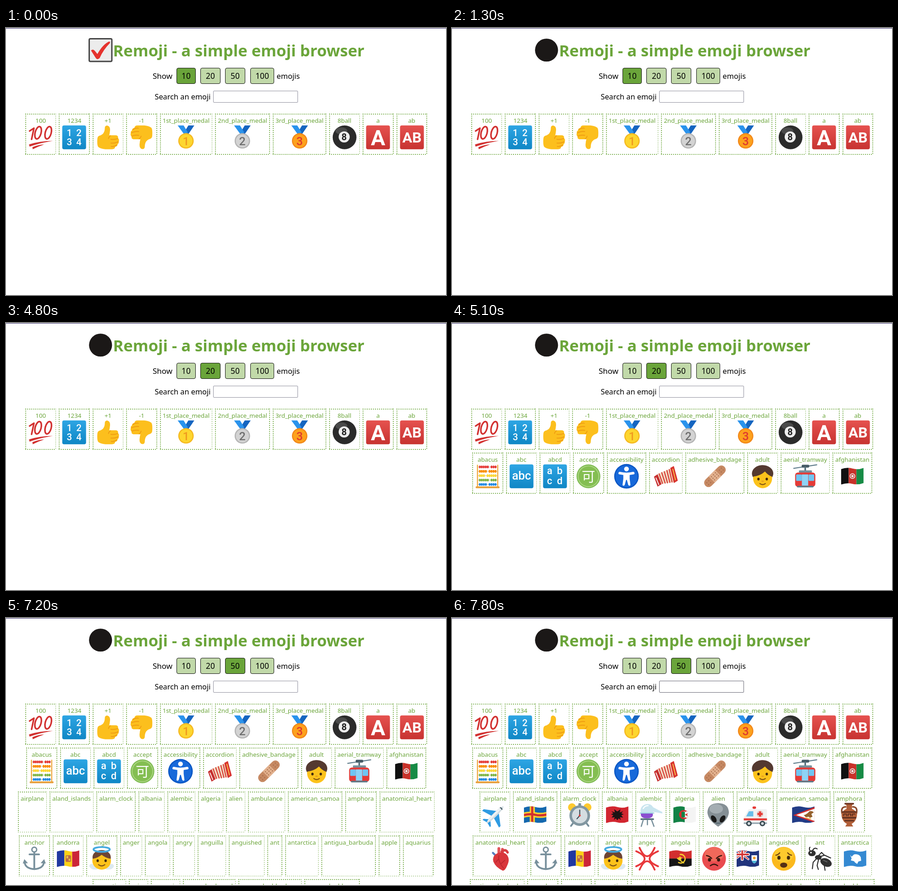
Recreate the animation shown at these times as an HTML page. Size 960x583 px, loop 8 s.

```html
<!DOCTYPE html>
<html lang="en">
<meta charset="utf-8">
<title>Emoji browser</title>
<style>
  html, body { margin: 0; width: 960px; height: 583px; overflow: hidden; background: #fff; }
  body { position: relative; font: 17px "Noto Sans", sans-serif; color: #000; }
  #bar { position: absolute; width: 960px; height: 1px; background: #3b3270; }
  #page > * { position: absolute; box-sizing: border-box; white-space: nowrap; }
  h1 { margin: 0; left: 0; top: 21px; width: 961px; height: 55px; display: flex; justify-content: center;
       font-size: 34.6px; line-height: 55px; color: #6ba53a; }
  h1 svg { width: 54.5px; height: 54.5px; }
  .btn { top: 87px; height: 35px; line-height: 33px; border: 1px solid #111; border-radius: 4px;
         text-align: center; font-size: 17.3px; background: #c1d9a9; }
  .btn.on { background: #6aa43a; }
  .txt { line-height: 24px; }
  #field { left: 452px; top: 137px; width: 184.5px; height: 26px; border: 1px solid #8f8f9d; border-radius: 2px; }
  #wait { left: 0; width: 961px; top: 184px; text-align: center; }
  #grid { left: 20.5px; top: 187.2px; width: 920px; display: flex; flex-wrap: wrap; justify-content: center; gap: 6.2px 6px; }
  .cell { --d: #6ba53a 1.8px, transparent 0; box-sizing: border-box; height: 89.6px; padding: 8px 6px 0; text-align: center;
    font-size: 13.3px; line-height: 15.7px; color: #6ba53a;
    background: linear-gradient(90deg, var(--d)) 0 0 / 4.4px 1.5px round no-repeat,
      linear-gradient(90deg, var(--d)) 0 100% / 4.4px 1.5px round no-repeat,
      linear-gradient(var(--d)) 0 0 / 1.5px 4.4px no-repeat round,
      linear-gradient(var(--d)) 100% 0 / 1.5px 4.4px no-repeat round; }
  .cell.hover { background-color: #e4efd9; }
  .cell svg { display: block; margin: auto; width: 55.4px; height: 55.4px; }
  [hidden], .cell[hidden], .cell svg.off, h1 svg.off { display: none; }
</style>
<svg width="0" height="0" style="position:absolute">
  <clipPath id="wave"><path d="M7 28Q36 17 64 25T120 22V98Q92 109 64 102T7 106Z"/></clipPath>
  <linearGradient id="shade" x2="0" y2="1">
    <stop stop-color="#fff" stop-opacity=".12"/><stop offset="1" stop-opacity=".12"/>
  </linearGradient>
</svg>
<div id="bar"></div>
<div id="page">
  <h1 id="title"></h1>
  <div class="txt" style="left:320px;top:93px">Show</div>
  <div class="btn" style="left:372px;width:42px">10</div>
  <div class="btn" style="left:424px;width:44px">20</div>
  <div class="btn" style="left:478px;width:44px">50</div>
  <div class="btn" style="left:533px;width:52px">100</div>
  <div class="txt" style="left:590.5px;top:93px;font-size:16.3px">emojis</div>
  <div class="txt" style="left:324.5px;top:138px;font-size:16.3px">Search an emoji</div>
  <div id="field"></div>
  <div id="wait">Loading...</div>
  <div id="grid"></div>
</div>
<script>
const $ = id => document.getElementById(id);

// Drawing helpers; every picture lives in a 128 x 128 box.
const p = (d, f) => `<path d="${d}" fill="${f}"/>`;
const s = (d, col, w = 6) =>
  `<path d="${d}" fill="none" stroke="${col}" stroke-width="${w}" stroke-linecap="round" stroke-linejoin="round"/>`;
const e = (x, y, rx, ry, f) => `<ellipse cx="${x}" cy="${y}" rx="${rx}" ry="${ry}" fill="${f}"/>`;
const c = (x, y, r, f) => e(x, y, r, r, f);
const r = (x, y, w, h, f, rx = 0) => `<rect x="${x}" y="${y}" width="${w}" height="${h}" rx="${rx}" fill="${f}"/>`;
const t = (x, y, size, str, f = '#fff', weight = 500) =>
  `<text x="${x}" y="${y}" font-size="${size}" fill="${f}" font-weight="${weight}" text-anchor="middle" font-family="Roboto,'Noto Sans CJK JP',sans-serif">${str}</text>`;
const turn = (a, body) => `<g transform="rotate(${a} 64 64)">${body}</g>`;
const svg = body => `<svg viewBox="0 0 128 128">${body}</svg>`;

const tile = (col, body) => r(4, 4, 120, 120, col, 9) + r(4, 4, 120, 120, 'url(#shade)', 9) + body;
const blue = body => tile('#1199e0', body);
const red = body => tile('#e23a37', body);
const flag = body => `<g clip-path="url(#wave)">${body}</g>`;
const field = col => r(0, 0, 128, 128, col);
const band = (y, w, col) => s(`M0 ${y}Q36 ${y - 10} 64 ${y - 3}T128 ${y - 6}`, col, w);
const thirds = (a, b, d) => r(0, 0, 45, 128, a) + r(45, 0, 39, 128, b) + r(84, 0, 44, 128, d);
const eyes = (dx, y, rx, ry, f = '#422b0d') => e(64 - dx, y, rx, ry, f) + e(64 + dx, y, rx, ry, f);
const thumb = p('M10 72Q10 57 27 54Q44 46 47 26L48 13Q51 3 62 5Q75 9 74 28Q73 43 70 54H104Q117 56 114 68Q122 74 118 85Q119 95 112 99Q111 110 100 112Q98 124 84 124H50Q26 122 14 112Q8 104 10 72Z', '#fcbf1d')
  + s('M78 74Q96 77 113 70M78 93Q97 95 115 87M80 110Q92 113 108 103M76 56Q68 62 66 70', '#ee9a12', 4);
const medal = (n, rim, fill, ink) =>
  p('M106 4H76L54 40 76 48Z', '#1565c0') + p('M22 4H52L74 40 54 48Z', '#2a93ec')
  + c(64, 82, 39, rim) + c(64, 82, 33, fill) + t(64, 103, 58, n, ink);
const hair = '#6d4434';

const art = {
  100: s('M8 32 30 18 18 74', '#d23130', 8)
    + [51, 102].map(x => `<ellipse cx="${x}" cy="41" rx="15" ry="32" transform="rotate(15 ${x} 41)" fill="none" stroke="#d23130" stroke-width="8"/>`).join('')
    + p('M5 100Q60 82 125 82Q62 92 8 111Z', '#d23130') + p('M22 114Q52 101 82 100Q52 110 24 124Z', '#d23130'),
  1234: blue(t(40, 58, 47, 1) + t(88, 58, 47, 2) + t(40, 104, 47, 3) + t(88, 104, 47, 4)),
  '+1': thumb,
  '-1': turn(180, thumb),
  '1st_place_medal': medal(1, '#f5b921', '#fdd62f', '#ef9b20'),
  '2nd_place_medal': medal(2, '#b5b5b5', '#d3d3d3', '#6f6f6f'),
  '3rd_place_medal': medal(3, '#f2881a', '#fda21d', '#df3b2f'),
  '8ball': c(64, 64, 60, '#2b2b2b') + e(48, 32, 30, 18, '#4a4a4a') + c(62, 62, 28, '#eee') + t(62, 79, 46, 8, '#222', 700),
  a: red(t(64, 103, 108, 'A', '#fff', 700)),
  ab: red(t(64, 90, 74, 'AB', '#fff', 700)),
  abacus: r(10, 6, 6, 112, '#f3b04b') + r(112, 6, 6, 112, '#f3b04b')
    + ['#e53935', '#fb8c00', '#fdd835', '#7cb342', '#1e88e5'].map((col, j) => {
      const y = 17 + j * 22;
      let row = s(`M14 ${y}H114`, '#b0a090', 2);
      for (let k = 0; k < 8; k++) row += e(25 + k * 10 + (k > 4 - j % 3 ? 9 : 0), y, 5, 7, col);
      return row;
    }).join('') + r(4, 115, 120, 9, '#e7a03c', 3),
  abc: blue(t(64, 81, 59, 'abc')),
  abcd: blue(t(37, 54, 50, 'a') + t(88, 54, 50, 'b') + t(37, 104, 50, 'c') + t(88, 104, 50, 'd')),
  accept: c(64, 64, 60, '#7cb950') + c(64, 64, 55, '#a9d57f') + c(64, 64, 50, '#84be52') + t(64, 89, 68, '可'),
  accessibility: c(64, 64, 62, '#0b57c4') + c(64, 64, 56, '#1769da') + c(64, 27, 12, '#fff')
    + s('M30 48Q64 56 98 48', '#fff', 13) + p('M48 46H80V76L84 108Q80 116 73 108L66 82H62L55 108Q48 116 44 108L48 76Z', '#fff'),
  accordion: p('M20 54L90 24 106 92 40 102Z', '#f3e3cb')
    + s('M30 52 47 100M43 46 60 98M56 41 72 97M69 35 84 95M81 30 95 93', '#d9473f', 6)
    + p('M4 66L22 54 42 104 22 116Z', '#c62f2f') + p('M86 22L104 12 124 86 104 98Z', '#d8342f')
    + s('M14 72 28 106', '#fff', 4) + s('M99 28 112 82', '#ffd24d', 4),
  adhesive_bandage: turn(-45, r(-4, 42, 136, 44, '#c68963', 22) + r(41, 42, 46, 44, '#e2b18e')
    + [50, 64, 78].map(x => c(x, 53, 3, '#a96e4c') + c(x, 64, 3, '#a96e4c') + c(x, 75, 3, '#a96e4c')).join('')
    + [12, 26, 102, 116].map(x => c(x, 58, 3, '#a96e4c') + c(x, 71, 3, '#a96e4c')).join('')),
  adult: e(64, 50, 54, 42, '#543930') + e(64, 74, 48, 50, '#fcc21b') + p('M16 66Q8 10 62 8Q120 10 112 66Q92 60 76 40Q52 62 16 66Z', '#543930')
    + eyes(21, 78, 6, 7) + s('M50 101Q64 111 78 101', '#7b4f16', 5) + e(64, 89, 7, 3, '#e59b20'),
  aerial_tramway: s('M6 24 122 6', '#607d8b', 5) + r(46, 6, 38, 14, '#455a64', 5) + s('M64 18V40', '#546e7a', 8)
    + r(32, 34, 66, 12, '#78909c', 4) + r(13, 45, 102, 72, '#e53a36', 14)
    + [18, 47, 81].map((x, i) => r(x, 55, i == 1 ? 32 : 28, 32, '#6fc5f2', 3)).join('') + r(47, 55, 32, 56, '#8ed3f6') + r(22, 112, 84, 8, '#607d8b', 4),
  afghanistan: flag(thirds('#111', '#c8322a', '#168b45')) + c(64, 63, 14, '#eee') + c(64, 63, 10, '#c8322a') + c(64, 63, 6, '#eee'),
  airplane: turn(45, p('M57 44L4 84V95L58 79ZM71 44L124 84V95L70 79Z', '#2e9be2') + p('M60 100L38 119V126L64 119 90 126V119L68 100Z', '#2e9be2')
    + e(64, 63, 10, 59, '#d3dde2') + e(61, 60, 5, 54, '#eef3f5') + s('M58 20Q64 15 70 20', '#455a64', 5)),
  aland_islands: flag(field('#1468ae') + band(67, 26, '#f8cf30') + r(36, 0, 26, 128, '#f8cf30') + band(67, 11, '#d32f2f') + r(43, 0, 11, 128, '#d32f2f')),
  alarm_clock: s('M32 104 20 120M96 104 108 120', '#78909c', 9) + c(25, 26, 20, '#fdc92f') + c(103, 26, 20, '#fdc92f') + r(57, 5, 14, 20, '#78909c', 4)
    + c(64, 68, 52, '#8297a1') + c(64, 68, 39, '#d5dde1') + s('M64 40V68L50 84', '#37474f', 5) + c(64, 68, 5, '#e53935'),
  albania: flag(field('#d22630')) + p('M64 92L57 82 46 90 51 76 35 78 44 66 32 62 44 56 34 46 52 52 48 36 62 46H66L80 36 76 52 94 46 84 56 96 62 84 66 93 78 77 76 82 90 71 82Z', '#1c1414'),
  alembic: p('M12 44Q14 14 46 10Q66 8 76 26L122 50V57L76 49 74 56H14Z', '#c9e5ef') + s('M26 32Q34 18 50 18', '#fff', 6)
    + p('M14 55H74Q80 82 44 82Q10 82 14 55Z', '#8b4fd0') + s('M10 55H80', '#9ed2e0', 5) + r(12, 82, 68, 8, '#546e7a', 3)
    + s('M26 90 16 122M68 90 80 122M47 92V114', '#78909c', 6),
  algeria: flag(field('#f4f4f4') + r(0, 0, 64, 128, '#128246')) + c(63, 63, 22, '#d32f2f') + c(69, 63, 18, '#f4f4f4')
    + r(48, 49, 17, 28, '#128246') + s('M69 46A20 20 0 1 0 69 80', '#d32f2f', 6) + p('M64 63L80 56 76 64 81 72Z', '#d32f2f'),
  alien: p('M64 5Q118 6 118 54Q114 92 64 124Q14 92 10 54Q10 6 64 5Z', '#858f95') + e(54, 34, 34, 24, '#a4adb2')
    + turn(-32, e(34, 70, 12, 20, '#1a1a1a')) + turn(32, e(94, 70, 12, 20, '#1a1a1a')) + s('M54 106H74', '#455a64', 4),
  ambulance: r(50, 22, 18, 12, '#e53935', 5) + p('M6 104V78L26 44Q28 36 36 36H116Q123 36 123 44V108H10Z', '#f1f1f1')
    + p('M18 72L32 46H54V72Z', '#68bde8') + r(6, 82, 117, 10, '#e53935') + c(88, 60, 17, '#e6c8c5') + r(83, 47, 10, 26, '#e53935') + r(75, 55, 26, 10, '#e53935')
    + r(6, 103, 117, 7, '#90a4ae') + [32, 100].map(x => c(x, 108, 14, '#37474f') + c(x, 108, 7, '#cfd8dc')).join(''),
  american_samoa: flag(field('#223c86') + p('M12 66L128 22V106Z', '#d32f2f') + p('M28 65L128 31V98Z', '#fff'))
    + p('M66 66Q84 60 94 46Q108 42 116 52L104 60 110 74 96 80 92 74 76 76Z', '#94602c') + s('M76 80 102 84', '#f0b53b', 4),
  amphora: s('M46 24Q20 24 28 58M82 24Q108 24 100 58', '#8b4a2c', 8) + p('M44 5H84L78 18V34Q108 48 102 74Q96 100 76 110L84 123H44L52 110Q32 100 26 74Q20 48 50 34V18Z', '#b15f38')
    + r(40, 4, 48, 8, '#6e3522', 3) + r(28, 47, 72, 6, '#53281b') + r(29, 76, 70, 6, '#53281b') + s('M36 70V60H50V70M58 70V60H72V70M80 70V60H93', '#53281b', 4) + s('M42 94H86', '#53281b', 5),
  anatomical_heart: s('M56 40V12M74 42V16', '#e2545a', 14) + s('M42 50 26 34', '#5a7fc0', 10) + s('M70 28Q90 12 100 32', '#d63d42', 12)
    + p('M42 40Q70 24 92 40Q116 62 98 98Q88 124 76 124Q40 108 28 78Q22 54 42 40Z', '#d9363c') + s('M56 48Q50 76 80 112M54 66 40 82M68 88 86 72', '#b9262e', 4),
  anchor: s('M64 34V116M40 42H88', '#78909c', 9) + `<circle cx="64" cy="18" r="12" fill="none" stroke="#78909c" stroke-width="7"/>`
    + s('M15 82Q20 114 64 116Q108 114 113 82', '#78909c', 9) + p('M6 88L14 66 32 86ZM122 88L114 66 96 86Z', '#78909c'),
  andorra: flag(thirds('#2038a0', '#fbd116', '#cc2638')) + r(51, 46, 27, 34, '#bd6b44', 6) + r(55, 50, 9, 12, '#e7c34f') + r(66, 64, 8, 10, '#e7c34f'),
  angel: p('M30 96Q4 82 2 102Q10 122 44 118ZM98 96Q124 82 126 102Q118 122 84 118Z', '#dce9f0') + e(64, 56, 46, 36, hair)
    + e(64, 74, 47, 45, '#fcc21b') + p('M18 64Q20 32 64 28Q108 32 110 64Q86 62 64 44Q42 62 18 64Z', hair) + eyes(20, 74, 6, 7) + s('M48 94Q64 106 80 94', '#7b4f16', 5)
    + `<ellipse cx="64" cy="17" rx="41" ry="12" fill="none" stroke="#43a9e0" stroke-width="9"/>`,
  anger: [0, 90, 180, 270].map(a => turn(a, s('M26 9Q64 94 102 9', '#e8383b', 9))).join(''),
  angola: flag(r(0, 0, 128, 64, '#d32f2f') + r(0, 63, 128, 65, '#161616')) + s('M62 42A22 22 0 1 1 54 83', '#f9cf2d', 6) + s('M48 62 80 85', '#f9cf2d', 5) + p('M61 50l4 7 8 1-6 6 1 8-7-4-7 4 1-8-6-6 8-1Z', '#f9cf2d'),
  angry: c(64, 64, 60, '#e94b4f') + e(64, 42, 48, 36, '#f0685a') + s('M26 48Q40 50 52 62M102 48Q88 50 76 62', '#37180f', 6)
    + eyes(23, 69, 8, 9, '#37180f') + s('M46 99Q64 84 82 99', '#37180f', 6),
  anguilla: flag(field('#20337c') + s('M0 16 66 66M66 16 0 66', '#fff', 10) + s('M0 16 66 66M66 16 0 66', '#d32f2f', 4)
    + s('M0 42H66M35 8V67', '#fff', 15) + s('M0 42H66M35 8V67', '#d32f2f', 8)) + p('M82 46H110V68Q108 82 96 88Q84 82 82 68Z', '#fff') + c(96, 60, 7, '#f09b2d') + p('M83 74H109Q105 84 96 88Q87 84 83 74Z', '#49b6d6'),
  anguished: c(64, 64, 60, '#fbb91d') + e(64, 45, 48, 38, '#fdc92d') + s('M24 46Q36 44 44 34M104 46Q92 44 84 34', '#6c3d12', 5)
    + eyes(24, 59, 8, 10) + e(64, 96, 18, 13, '#553015'),
  ant: s('M26 24Q36 4 50 14M14 24Q8 12 14 6M52 58 30 82 26 114M58 64 50 98 56 118M66 64 86 96 90 122M62 54 88 46 118 60M56 50 72 32 84 44', '#2b2b2b', 5)
    + e(24, 36, 19, 15, '#303030') + e(56, 57, 17, 12, '#303030') + turn(25, e(100, 68, 30, 20, '#303030')) + c(19, 33, 4, '#fff') + s('M82 72 100 80', '#666', 4),
  antarctica: flag(field('#3489d2')) + p('M38 44L46 54 58 42Q82 38 92 56L94 74 80 78 74 90 64 84 58 76 42 72 46 62Z', '#fff')
};

const names = ('100 1234 +1 -1 1st_place_medal 2nd_place_medal 3rd_place_medal 8ball a ab '
  + 'abacus abc abcd accept accessibility accordion adhesive_bandage adult aerial_tramway afghanistan '
  + 'airplane aland_islands alarm_clock albania alembic algeria alien ambulance american_samoa amphora anatomical_heart '
  + 'anchor andorra angel anger angola angry anguilla anguished ant antarctica antigua_barbuda apple aquarius '
  + 'argentina aries armenia arrow_backward arrow_double_down arrow_double_up').split(' ');

$('title').innerHTML = svg(r(7, 7, 114, 114, '#ececec', 6)
    + `<rect x="6" y="6" width="116" height="116" rx="6" fill="none" stroke="#454545" stroke-width="7"/>`
    + p('M15 66Q26 56 35 68L48 84Q76 34 108 20Q114 20 112 28Q78 62 60 104Q48 118 38 102Z', '#e5322d'))
  + svg(c(64, 64, 59, '#1b1817')) + '<span>Remoji - a simple emoji browser</span>';
$('grid').innerHTML = names.map(n => `<div class="cell">${n}${svg(art[n] || '')}</div>`).join('');

const cells = [...document.querySelectorAll('.cell')];
const pics = cells.map(el => el.lastChild);
const buttons = [...document.querySelectorAll('.btn')];
const [tick, badge] = $('title').children;

// Moment at which picture i has arrived
function arrival(i) {
  if (i < 10) return 0;
  if (i < 20) return i < 14 ? 5000 : 5100;
  if (i == 31) return 7100;
  if (i == 32 || i == 33) return 7200;
  if (i == 20) return 7300;
  return i % 2 ? 7400 : 7500;
}

function draw(ms) {
  const count = ms < 300 ? 10 : ms < 1000 ? 0 : ms < 4900 ? 10 : ms < 6600 ? 20 : 50;
  const chosen = ms < 4800 ? 0 : ms < 6400 ? 1 : 2;
  $('page').hidden = ms >= 300 && ms < 500;
  $('wait').hidden = count > 0;
  tick.classList.toggle('off', ms >= 300);
  badge.classList.toggle('off', ms < 1300);
  buttons.forEach((b, i) => b.classList.toggle('on', i == chosen));
  $('field').style.borderColor = ms < 7800 ? '#8f8f9d' : '#676774';
  cells.forEach((el, i) => {
    el.hidden = i >= count;
    pics[i].classList.toggle('off', ms < arrival(i));
  });
  cells[4].classList.toggle('hover', ms >= 2400 && ms < 2500);
}

const start = performance.now();
function frame(now) {
  draw(Math.max(0, now - start) % 8000);
  requestAnimationFrame(frame);
}
draw(0);
requestAnimationFrame(frame);
</script>
</html>
```
